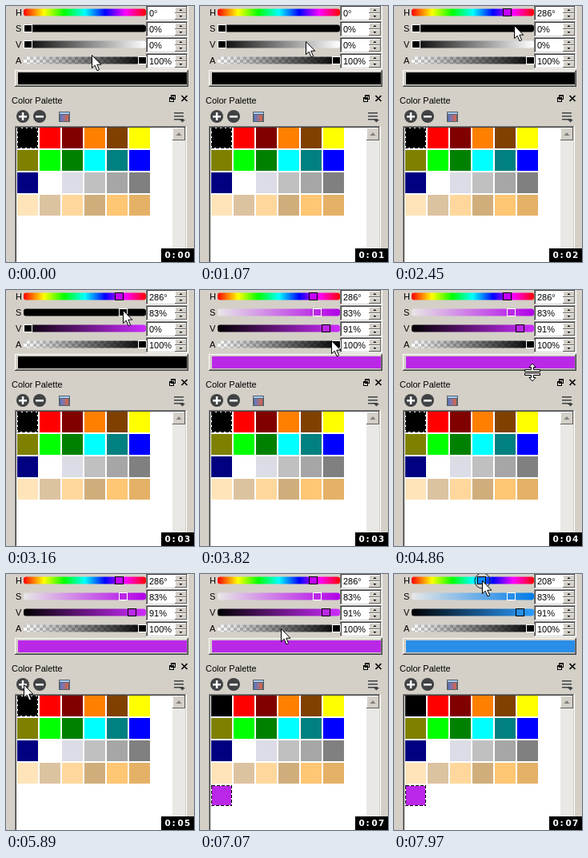
These frames come from a looping animation (235x320 px, 8000 ms). An HTML page:

```html
<!DOCTYPE html>
<html lang="en">
<head>
<meta charset="utf-8">
<title>Color palette</title>
<style>
  html, body { margin: 0; width: 100%; height: 100%; overflow: hidden; background: #d4d0c8; }
  svg { display: block; width: 235px; height: 320px; shape-rendering: crispEdges; }
  text { font: 11px "Liberation Sans", Arial, sans-serif; fill: #000; white-space: pre; }
  .clock { font: bold 10.5px "DejaVu Sans", Verdana, sans-serif; fill: #fff; }
  .smooth { shape-rendering: auto; }
</style>
</head>
<body>
<svg id="stage" viewBox="0 0 235 320" xmlns="http://www.w3.org/2000/svg">
  <defs>
    <linearGradient id="hue"></linearGradient>
    <linearGradient id="sat"><stop/><stop offset="1"/></linearGradient>
    <linearGradient id="val"><stop/><stop offset="1"/></linearGradient>
    <linearGradient id="alpha"><stop stop-opacity="0"/><stop offset="1"/></linearGradient>
    <linearGradient id="sunset"><stop stop-color="#5a7cd2"/><stop offset="1" stop-color="#dc6444"/></linearGradient>
    <pattern id="checks" x="22" y="63" width="8" height="8" patternUnits="userSpaceOnUse">
      <rect width="8" height="8" fill="#fff"/>
      <path d="M0 0h4v4H0zM4 4h4v4H4z" fill="#ccc"/>
    </pattern>
  </defs>
</svg>
<script>
const LOOP = 8000;
const PANEL = '#d4d0c8';
const stage = document.getElementById('stage');
const byId = id => document.getElementById(id);

function set(el, attrs) {
  for (const k in attrs) el.setAttribute(k, attrs[k]);
}
function add(tag, attrs, text) {
  const el = document.createElementNS(stage.namespaceURI, tag);
  set(el, attrs);
  if (text !== undefined) el.textContent = text;
  stage.append(el);
  return el;
}
const soft = { class: 'smooth' };
const rect = (x, y, width, height, fill, more) => add('rect', { x, y, width, height, fill, ...more });
const path = (d, fill, more) => add('path', { d, fill, ...more });
const label = (x, y, s, more) => add('text', { x, y, ...more }, s);
const show = (el, on) => set(el, { visibility: on ? 'visible' : 'hidden' });

// Face with light and dark edges.
function bevel(x, y, w, h, face, topLeft, bottomRight) {
  rect(x, y, w, h, bottomRight);
  rect(x, y, w - 1, h - 1, topLeft);
  rect(x + 1, y + 1, w - 2, h - 2, face);
}
// Two-pixel sunken field.
function sunken(x, y, w, h) {
  bevel(x, y, w, h, PANEL, '#808080', '#fff');
  bevel(x + 1, y + 1, w - 2, h - 2, '#fff', '#404040', PANEL);
}

function hsv(h, s, v) {
  const ch = n => {
    const k = (n + h / 60) % 6;
    return Math.round(255 * v * (1 - s * Math.max(0, Math.min(k, 4 - k, 1))));
  };
  return `rgb(${ch(5)},${ch(3)},${ch(1)})`;
}

rect(0, 0, 235, 320, PANEL);

// Sliders and spin boxes
for (let i = 0; i <= 6; i++) {
  byId('hue').append(add('stop', { offset: i / 6, 'stop-color': hsv(i * 60, 1, 1) }));
}
function sliderRow(id, i) {
  const y = 20 * i;
  const bar = fill => rect(22, y + 3.5, 153, 9, fill, { rx: 3, ...soft });
  label(12, y + 12, id[0].toUpperCase());
  if (id === 'alpha') bar('url(#checks)');
  bar(`url(#${id})`);
  sunken(175, y - 1, 53, 20);
  for (const dir of [-1, 1]) {
    const top = y + 5 + 4 * dir;
    bevel(211, top, 15, 8, PANEL, '#fff', '#707070');
    path(`M216.5 ${top + 4 - dir}h4l-2 ${2 * dir}z`, '#000', soft);
  }
  return {
    value: label(179, y + 13, ''),
    knob: rect(0, y + 3.5, 10, 9, '#000')
  };
}
const rows = ['hue', 'sat', 'val', 'alpha'].map(sliderRow);

// Current colour
bevel(11, 80, 217, 21, '#808080', '#fff', '#404040');
rect(12, 81, 214, 18, PANEL);
const preview = rect(15, 83, 211, 15, '#000');

// Dock title
label(7, 122, 'Color Palette');
path('M206.5 111.5h5v5h-5zM206 112.5h6M204.5 114.5h5v5h-5zM204 115.5h6', PANEL, { stroke: '#000' });
path('M219.5 112l7 7m0-7l-7 7', 'none', { stroke: '#000', 'stroke-width': 1.7, ...soft });

// Toolbar
for (const cx of [21, 42]) {
  add('circle', { cx, cy: 138, r: 8, fill: '#404244', ...soft });
  rect(cx - 5, 137, 10, 2.5, '#fff', soft);
}
rect(19.8, 133, 2.5, 10, '#fff', soft);
rect(66, 132, 14, 13, '#56606c');
rect(67, 133, 12, 2, '#a4cdf2');
rect(68, 136, 10, 8, 'url(#sunset)');
for (let i = 0; i < 3; i++) rect(210, 133 + 4 * i, 12, 1.5, '#404244', soft);
path('M217 142h7l-3.5 3.5z', '#404244', soft);

// Swatch list
sunken(11, 150, 215, 180);
rect(208, 152, 16, 168, '#eae8e4');
bevel(208, 152, 16, 16, PANEL, '#fff', '#606060');
path('M212.5 162h7l-3.5-4z', '#808080', soft);

const swatch = (i, fill) => rect(14 + 28 * (i % 6), 152 + 28 * Math.floor(i / 6), 26, 26, fill);
const colors = 'black red maroon #ff8000 #804000 yellow olive lime green aqua teal blue ' +
  'navy white #dcdce6 silver #a6a6a6 gray #ffe4ba #dcc3a0 #ffd79c #d0ae7c #ffc673 #e5b167';
colors.split(' ').forEach((c, i) => swatch(i, c));
const added = swatch(24, '');
const focus = ['#fff', '#000'].map((stroke, i) => rect(14.5, 0, 25, 25, 'none', {
  stroke, 'stroke-dasharray': i ? '4 2' : 'none'
}));

// Clock
rect(194, 303, 41, 17, '#000');
const clock = label('198.5 207.5 214.5 223', 315, '', { class: 'clock' });

// Pointer shapes
const ring = add('circle', { r: 9.6, fill: 'none', stroke: '#222', ...soft });
const ink = { stroke: '#000', ...soft };
const arrow = path('M.5.5V16.6L4.2 13.2 7 19.8 9.6 18.7 6.8 12.2H11.8Z', '#fff', ink);
const half = s => `M0 ${-11 * s}L4 ${-6.5 * s}H1.5V${-3.5 * s}H9.5V${-s}H-9.5V${-3.5 * s}H-1.5V${-6.5 * s}H-4Z`;
const splitter = path(half(1) + half(-1), '#fff', ink);

// Where the pointer arrives: time, x, y
const stops = [
  [0, 107, 61], [420, 64, 74], [870, 124, 56], [1070, 132, 44], [1190, 130, 18],
  [1800, 127, 8], [2070, 141, 7], [2450, 150, 24], [2940, 146, 25], [3400, 157, 48],
  [3820, 164, 63], [4630, 170, 80], [4860, 173, 103], [5350, 66, 250], [5890, 22, 138],
  [7290, 128, 44], [7650, 128, 8], [7970, 110, 8]
];
const presses = [[1350, 2150], [2800, 2990], [3360, 3580], [5960, 6080], [7650, LOOP]];

// The pointer rests at each stop, then eases to the next; longer ways take longer.
function pointer(t) {
  const i = stops.findIndex(p => p[0] > t);
  if (i < 0) return stops.at(-1).slice(1);
  const [, x0, y0] = stops[i - 1];
  const [end, x1, y1] = stops[i];
  const span = Math.min(end - stops[i - 1][0], 100 + 4 * Math.hypot(x1 - x0, y1 - y0));
  const u = Math.max(0, 1 - (end - t) / span);
  const k = u * u * (3 - 2 * u);
  return [Math.round(x0 + (x1 - x0) * k), Math.round(y0 + (y1 - y0) * k)];
}

// Slider value dragged by the pointer from one time to another.
const dragged = (t, from, to) => t < from ? 0 : (pointer(Math.min(t, to))[0] - 27.5) / 143;

function gradient(id, ...colors) {
  colors.forEach((c, i) => set(byId(id).children[i], { 'stop-color': c }));
}

function draw(t) {
  const hue = t < 7700 ? dragged(t, 1550, 2070) : dragged(t, 7700, LOOP);
  const s = dragged(t, 2840, 2940);
  const v = dragged(t, 3400, 3400);
  const h = Math.round(360 * hue);
  const color = hsv(h, s, v);
  gradient('sat', hsv(h, 0, v), hsv(h, 1, v));
  gradient('val', '#000', hsv(h, s, 1));
  set(preview, { fill: color });

  const pct = n => Math.round(n * 100) + '%';
  [
    [hue, h + '°', hsv(h, 1, 1), '#000'],
    [s, pct(s), color, '#fff'],
    [v, pct(v), color, v ? '#000' : '#fff'],
    [1, '100%', '#000', '#fff']
  ].forEach(([at, text, fill, stroke], i) => {
    rows[i].value.textContent = text;
    set(rows[i].knob, { x: Math.round(27 + 143 * at) - 4.5, fill, stroke });
  });
  show(rows[0].knob, h > 0);

  const hasNew = t >= 6080;
  show(added, hasNew);
  set(added, { fill: hsv(286, .83, .91) });
  focus.forEach(r => set(r, { y: hasNew ? 264.5 : 152.5 }));
  clock.textContent = '0:0' + Math.max(0, Math.floor((t - 60) / 1000));

  const [x, y] = pointer(t);
  const onSplitter = y > 97 && y < 109;
  for (const shape of [arrow, splitter]) {
    set(shape, { transform: `translate(${x} ${y})` });
    show(shape, onSplitter === (shape === splitter));
  }
  set(ring, { cx: x + .5, cy: y + .5 });
  show(ring, presses.some(([from, to]) => t >= from && t < to));
}

const start = performance.now();
function tick() {
  draw((performance.now() - start) % LOOP);
  requestAnimationFrame(tick);
}
tick();
</script>
</body>
</html>
```
